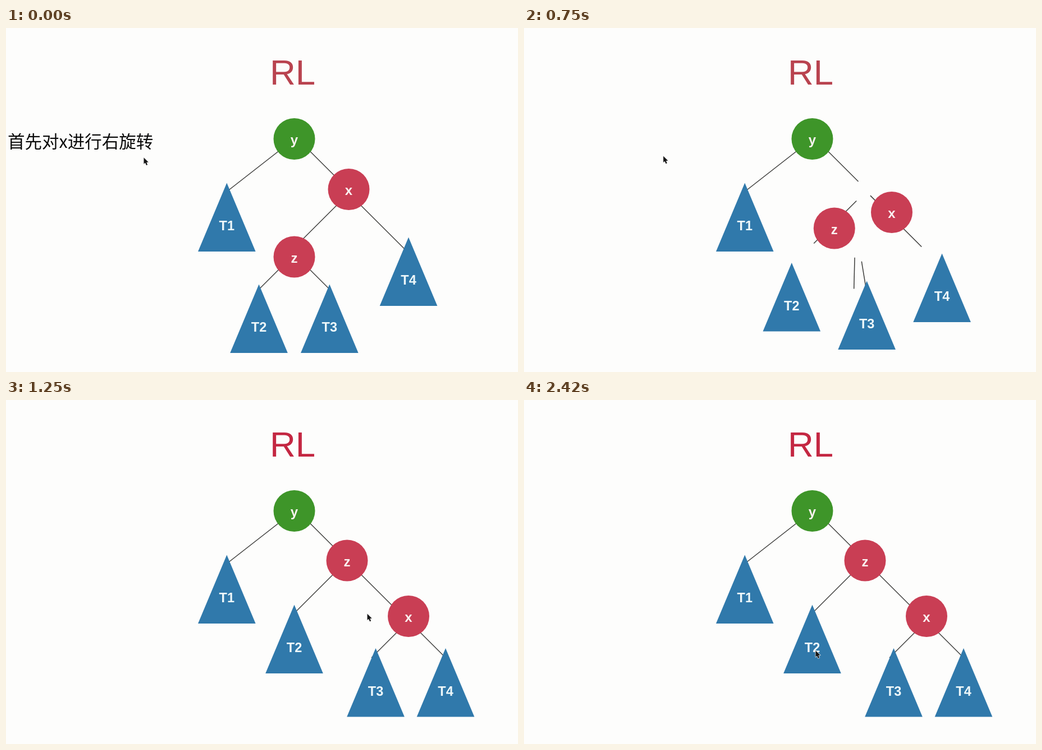
Animation, 912 px wide and 614 px high, one loop 2510 ms. Source, as an HTML page with a canvas:

```html
<!DOCTYPE html>
<html lang="zh">
<head>
<meta charset="utf-8">
<title>RL</title>
<style>
html, body { margin: 0; width: 100%; height: 100%; overflow: hidden; background: #fdfdfc; }
canvas { display: block; }
</style>
</head>
<body>
<canvas id="stage" width="912" height="614"></canvas>
<script>
const ctx = document.getElementById("stage").getContext("2d");
const LOOP = 2510, STEP = 250 / 3, LAST = 29;
const RED = "#c93e54", GREEN = "#3e9529", BLUE = "#3079ab";
const SANS = '"Liberation Sans", Arial, sans-serif';

// Circle centres (third value: how far below the centre its two edges meet)
// and triangle tips, before and after the rotation
const Y = [513.5, 198, -6], T1 = [393.3, 276.5];
const before = {
  x: [610.5, 288, 7], z: [513.5, 408.5, -5],
  T2: [450.5, 457.5], T3: [576.3, 457.5], T4: [717, 373.5]
};
const after = {
  x: [717, 386, 8], z: [607.5, 286.5, 0],
  T2: [513.5, 365.5], T3: [658.5, 443], T4: [783, 443]
};
const LEFT = -1, RIGHT = 1;

const clamp = v => Math.max(0, Math.min(1, v));
const ease = v => (1 - Math.cos(Math.PI * clamp(v))) / 2;
const mix = (a, b, p) => a.map((v, i) => v + (b[i] - v) * p);

// Diagonal edge leaving a node; returns both end points
function edge([x, y, drop], side, from, to) {
  const at = d => [x + side * d, y + drop + d];
  return [...at(from), ...at(to)];
}

function branch(layout, name, side) {
  const upper = (name === "x") === (layout === before);
  const from = name === "x" && side === RIGHT ? 1 : 17;
  return edge(layout[name], side, from, upper ? 96 + 3 * side : 66);
}

// Each branch turns into one of the other node's branches
const branches = [
  ["x", RIGHT, "z", RIGHT],
  ["x", LEFT, "z", LEFT],
  ["z", LEFT, "x", RIGHT],
  ["z", RIGHT, "x", LEFT]
].map(([a, sideA, b, sideB]) => [branch(before, a, sideA), branch(after, b, sideB)]);

// time, x, y of the pointer tip
const pointer = [
  [0, 245, 231], [920, 248, 228], [1200, 644, 382], [2080, 527, 273], [2416, 519, 447]
];

function text(str, x, y, font, color, align = "center") {
  ctx.font = font;
  ctx.fillStyle = color;
  ctx.textAlign = align;
  ctx.fillText(str, x, y);
}

function polygon(points) {
  ctx.beginPath();
  points.forEach(([x, y]) => ctx.lineTo(x, y));
  ctx.closePath();
}

function drawEdge([x1, y1, x2, y2]) {
  ctx.beginPath();
  ctx.moveTo(x1, y1);
  ctx.lineTo(x2, y2);
  ctx.strokeStyle = "#3c3c3a";
  ctx.lineWidth = 1.5;
  ctx.stroke();
}

function drawSubtree(label, [x, y]) {
  polygon([[x, y], [x + 51.3, y + 122.5], [x - 51.3, y + 122.5]]);
  ctx.fillStyle = BLUE;
  ctx.fill();
  text(label, x, y + 84.5, "bold 23.5px " + SANS, "#eef8fa");
}

function drawNode(label, color, [x, y]) {
  ctx.beginPath();
  ctx.arc(x, y, 37, 0, Math.PI * 2);
  ctx.fillStyle = color;
  ctx.fill();
  text(label, x, y + 10, "bold 24px " + SANS, "#fbf3f2");
}

function drawPointer(t) {
  const i = Math.max(1, pointer.findIndex(k => k[0] >= t));
  const a = pointer[i - 1], b = pointer.at(i);
  const [, x, y] = mix(a, b, ease((t - a[0]) / (b[0] - a[0])));
  ctx.save();
  ctx.translate(x, y);
  polygon([[0.5, 0.5], [0.5, 11.5], [3, 9.5], [5, 14], [7, 13], [5.2, 8.8], [8.6, 8.5]]);
  ctx.lineJoin = "round";
  ctx.lineWidth = 1.8;
  ctx.strokeStyle = "rgba(235,235,235,.8)";
  ctx.stroke();
  ctx.fillStyle = "#151515";
  ctx.fill();
  ctx.restore();
}

function draw(now) {
  const frame = Math.min(LAST, Math.floor((now % LOOP + 4) / STEP));
  const t = Math.floor(frame * STEP);
  const p = ease((t - 456) / 657);
  const place = name => mix(before[name], after[name], p);

  ctx.fillStyle = "#fdfdfc";
  ctx.fillRect(0, 0, 912, 614);
  text("RL", 470, 101, "63.5px " + SANS, t < 1210 ? "#b9434f" : "#c42742", "left");

  ctx.globalAlpha = 1 - clamp((t - 490) / 240);
  text("首先对x进行右旋转", 3, 214, '500 30.5px "Noto Sans CJK SC", "Noto Sans CJK", sans-serif', "#0a0a0a", "left");
  ctx.globalAlpha = 1;

  drawEdge([Y[0], Y[1], T1[0], T1[1] + 15.5]);
  drawEdge(edge(Y, RIGHT, 17, 82));
  branches.forEach(([a, b]) => drawEdge(mix(a, b, p)));

  drawSubtree("T1", T1);
  ["T2", "T3", "T4"].forEach(name => drawSubtree(name, place(name)));
  drawNode("y", GREEN, Y);
  ["x", "z"].forEach(name => drawNode(name, RED, place(name)));
  drawPointer(t);
}

const start = performance.now();
function tick() {
  draw(performance.now() - start);
  requestAnimationFrame(tick);
}
tick();
</script>
</body>
</html>
```
